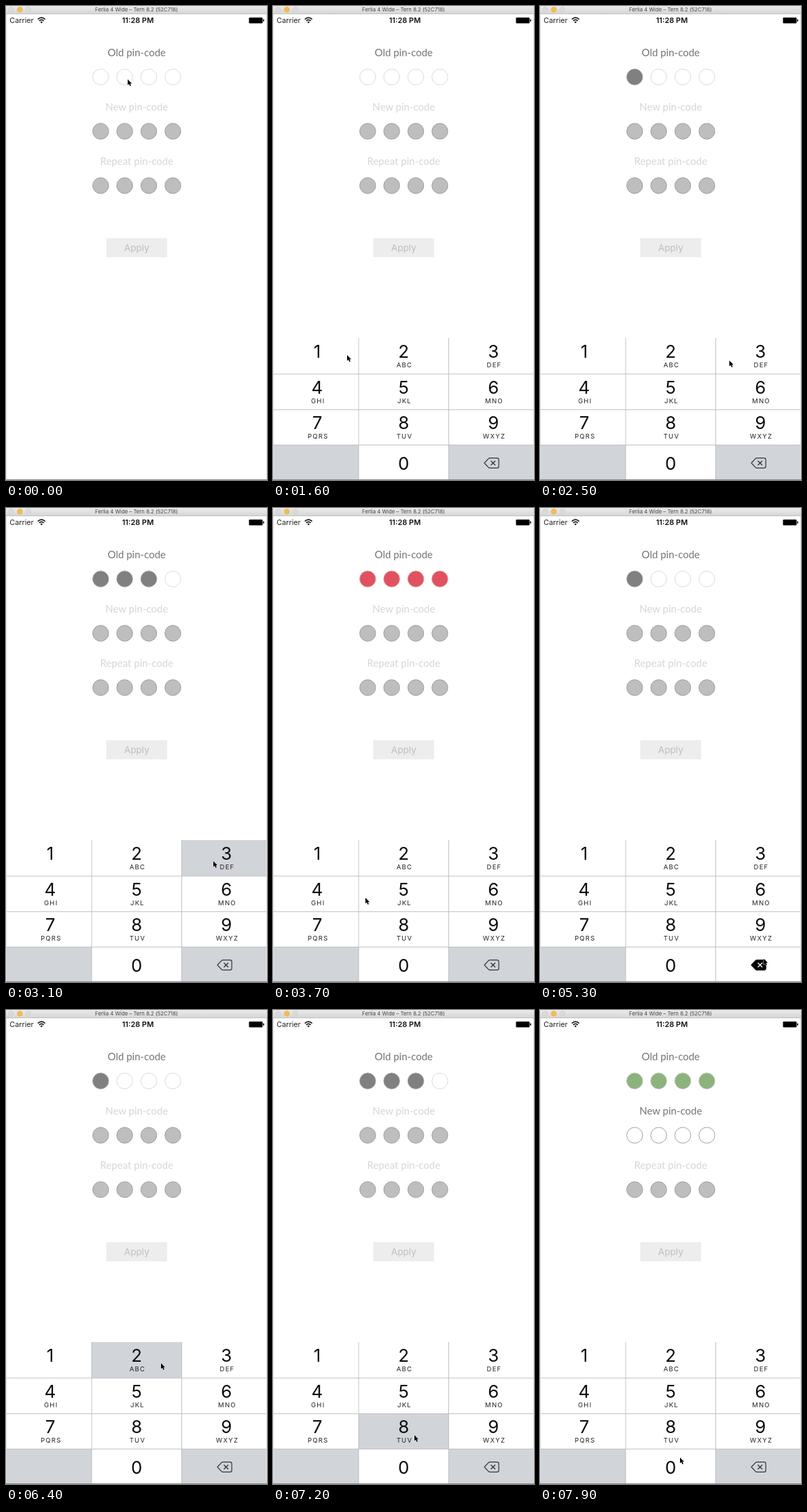
Animation of 384x698 px, one loop 8000 ms. Source, as an HTML page:

```html
<!DOCTYPE html>
<html lang="en">
<head>
<meta charset="utf-8">
<title>Pin-code form</title>
<style>
  html, body { margin: 0; width: 100%; height: 100%; overflow: hidden; background: #fff; }
  svg { display: block; width: 100vw; height: 100vh; }
  text { font-family: Inter, Roboto, sans-serif; text-anchor: middle; }
  .label { font: 15px Lato, "Open Sans", sans-serif; }
  .digit { font-size: 26px; fill: #0c0c0c; }
  .letters { font-size: 9.6px; letter-spacing: 1.2px; fill: #222; }
</style>
</head>
<body>
<svg id="stage" viewBox="0 0 384 698">
  <defs>
    <linearGradient id="bar" x2="0" y2="1">
      <stop stop-color="#ebebeb"/><stop offset="1" stop-color="#d5d5d5"/>
    </linearGradient>
  </defs>
  <rect width="384" height="698" fill="#fff"/>

  <g id="form">
    <rect x="147.5" y="342" width="89.5" height="28" fill="#ededed"/>
    <text x="192.3" y="361" font-size="13.6" fill="#bfbfbf">Apply</text>
  </g>

  <g id="keyboard"></g>

  <g id="frame">
    <path d="M.5 12V698M383.5 12V698" stroke="#dedede"/>
    <path d="M0 697.5H384" stroke="#8a8a8a"/>
    <rect width="384" height="12" fill="url(#bar)"/>
    <path d="M0 11.6H384" stroke="#b9b9b9" stroke-width=".8"/>
    <g stroke-width=".5">
      <circle cx="7.5" cy="5.3" r="3.8" fill="#dadada" stroke="#c9c9c9"/>
      <circle cx="20.3" cy="5.3" r="3.8" fill="#f6bd4b" stroke="#dda43a"/>
      <circle cx="33" cy="5.3" r="3.8" fill="#dadada" stroke="#c9c9c9"/>
    </g>
    <text x="192" y="8.3" font-size="7.75" fill="#444">Ferlia 4 Wide – Tern 8.2 (52C718)</text>
    <text x="23" y="25.3" font-size="10.8" fill="#222">Carrier</text>
    <g fill="none" stroke="#111" stroke-width="1.6">
      <path d="M46.8 19.6Q52.2 14.8 57.6 19.6M48.8 21.9Q52.2 18.9 55.6 21.9"/>
      <path d="M52.2 25.4L50.4 23.4Q52.2 22 54 23.4Z" fill="#111" stroke="none"/>
    </g>
    <text x="194" y="25.3" font-size="11" font-weight="600" fill="#111">11:28 PM</text>
    <rect x="357.5" y="17" width="20" height="8.5" rx="1.3"/>
    <rect x="378.2" y="19.5" width="1.5" height="3.5" rx=".7"/>
  </g>

  <path id="cursor" d="M0 0V8.6L2 6.8L3.4 10L5 9.3L3.6 6.2H6.2Z"
        fill="#000" stroke="#fff" stroke-width=".9" paint-order="stroke"/>
</svg>
<script>
const LOOP = 8000, STEP = 100;
const KEY_GREY = '#d1d4d9', LINE = '#b9bbbf';
const DARK = '#808080', RED = '#e0525f', GREEN = '#8cb37d';

// [time, x, y] of the pointer tip
const pointer = [
  [0, 179, 108], [600, 179, 108], [900, 165, 320], [1200, 143, 522], [1400, 96, 520],
  [1600, 109, 514], [2000, 109, 514], [2400, 321, 520], [2600, 236, 524], [2700, 236, 524],
  [2900, 333, 533], [3100, 305, 520], [3200, 305, 520], [3500, 110, 571], [3600, 114, 572],
  [3700, 136, 574], [3900, 281, 586], [4200, 349, 640], [4600, 329, 663], [5700, 329, 664],
  [6200, 228, 520], [6500, 228, 520], [6800, 212, 575], [6900, 212, 575], [7100, 208, 626],
  [7300, 208, 626], [7600, 206, 663], [7900, 206, 659], [8000, 206, 659]
];

// [key, press, release]
const presses = [
  ['1', 1800, 2000], ['2', 2700, 2800], ['3', 3100, 3200], ['4', 3500, 3600],
  ['del', 4800, 4900], ['del', 5000, 5200], ['del', 5300, 5500], ['del', 5600, 5700],
  ['2', 6400, 6500], ['5', 6800, 6900], ['8', 7200, 7300], ['0', 7600, 7700]
];

// [time, filled dots, colour]
const entries = [
  [0, 0, DARK], [1800, 1, DARK], [2700, 2, DARK], [3100, 3, DARK], [3500, 4, RED],
  [4800, 3, DARK], [5000, 2, DARK], [5300, 1, DARK], [5600, 0, DARK],
  [6400, 1, DARK], [6800, 2, DARK], [7200, 3, DARK], [7600, 4, GREEN]
];

const $ = id => document.getElementById(id);

function set(node, attrs) {
  for (const name in attrs) node.setAttribute(name, attrs[name]);
}

function add(parent, tag, attrs, text = '') {
  const node = document.createElementNS('http://www.w3.org/2000/svg', tag);
  set(node, attrs);
  node.textContent = text;
  return parent.appendChild(node);
}

function addRow(title, y) {
  const label = add($('form'), 'text', { class: 'label', x: 192.3, y: y - 30.5 }, title);
  const dots = [139.3, 174.6, 210.1, 245.5].map(cx =>
    add($('form'), 'circle', { cx, cy: y, r: 11.7 }));
  return { label, dots };
}

function paintRow(row, text, fill, stroke) {
  set(row.label, { fill: text });
  row.dots.forEach((dot, i) => set(dot, { fill: fill(i), stroke: stroke(i) }));
}

const rows = [addRow('Old pin-code', 104.5), addRow('New pin-code', 184.5),
              addRow('Repeat pin-code', 264.5)];

// Keyboard
const board = $('keyboard');
const colEdges = [0, 126, 258.5, 384], rowEdges = [489, 542, 594.5, 646.5, 698];
const colCentres = [65, 192.3, 324.3];
const letters = ['', 'ABC', 'DEF', 'GHI', 'JKL', 'MNO', 'PQRS', 'TUV', 'WXYZ'];
const keys = {};

['1', '2', '3', '4', '5', '6', '7', '8', '9', 'blank', '0', 'del'].forEach((name, i) => {
  const col = i % 3, row = Math.floor(i / 3);
  const x = colEdges[col], y = rowEdges[row];
  keys[name] = add(board, 'rect', {
    x, y, width: colEdges[col + 1] - x, height: rowEdges[row + 1] - y
  });
  if (name.length > 1) return;
  const base = name === '0' ? 682.5 : 518 + 52.5 * row;
  add(board, 'text', { class: 'digit', x: colCentres[col], y: base }, name);
  add(board, 'text', { class: 'letters', x: colCentres[col] + 1.2, y: base + 14 }, letters[i] || '');
});
add(board, 'path', {
  d: 'M126 489V698M258.5 489V698M0 542H384M0 594.5H384M0 646.5H384',
  stroke: LINE, 'stroke-width': .9
});
const delShape = add(board, 'path', {
  d: 'M311 673L317 666.6Q318 665.6 319.4 665.6H329.5Q332.2 665.6 332.2 668.3V677.7Q332.2 680.4 329.5 680.4H319.4Q318 680.4 317 679.4Z',
  'stroke-width': 1.2, 'stroke-linejoin': 'round'
});
const delCross = add(board, 'path', {
  d: 'M320.5 669.7L327.1 676.3M327.1 669.7L320.5 676.3', 'stroke-width': 1.3
});

function pointAt(t) {
  const i = pointer.findIndex(p => p[0] > t);
  const [t0, x0, y0] = pointer[i - 1], [t1, x1, y1] = pointer[i];
  const k = (t - t0) / (t1 - t0);
  return [x0 + (x1 - x0) * k, y0 + (y1 - y0) * k];
}

function draw(t) {
  const pressed = (presses.find(p => t >= p[1] && t < p[2]) || [])[0];
  const [, count, colour] = entries.filter(e => e[0] <= t).pop();

  paintRow(rows[0], '#757575',
    i => i < count ? colour : '#fff',
    i => i >= count ? '#dadada' : colour === DARK ? '#a0a0a0' : colour === RED ? '#e58b93' : '#b4c4ac');
  rows.slice(1).forEach((row, n) => {
    const active = n === 0 && t >= 7700;
    paintRow(row, active ? '#757575' : '#d6d6d6',
      () => active ? '#fff' : '#bebebe', () => active ? '#a0a0a0' : '#9e9e9e');
  });

  for (const name in keys) {
    const greyAtRest = name === 'blank' || name === 'del';
    set(keys[name], { fill: greyAtRest !== (name === pressed) ? KEY_GREY : '#fff' });
  }
  const deleting = pressed === 'del';
  set(delShape, { fill: deleting ? '#000' : 'none', stroke: deleting ? '#000' : '#333' });
  set(delCross, { stroke: deleting ? '#fff' : '#333' });

  const rise = Math.min(1, Math.max(0, (t - 300) / 500));
  set(board, { transform: `translate(0 ${210 * (1 - rise) ** 2.5})` });
  set($('cursor'), { transform: `translate(${pointAt(t)})` });
}

const start = performance.now();
function tick() {
  const t = (performance.now() - start) % LOOP;
  draw(Math.floor(t / STEP) * STEP);
  requestAnimationFrame(tick);
}
tick();
</script>
</body>
</html>
```
